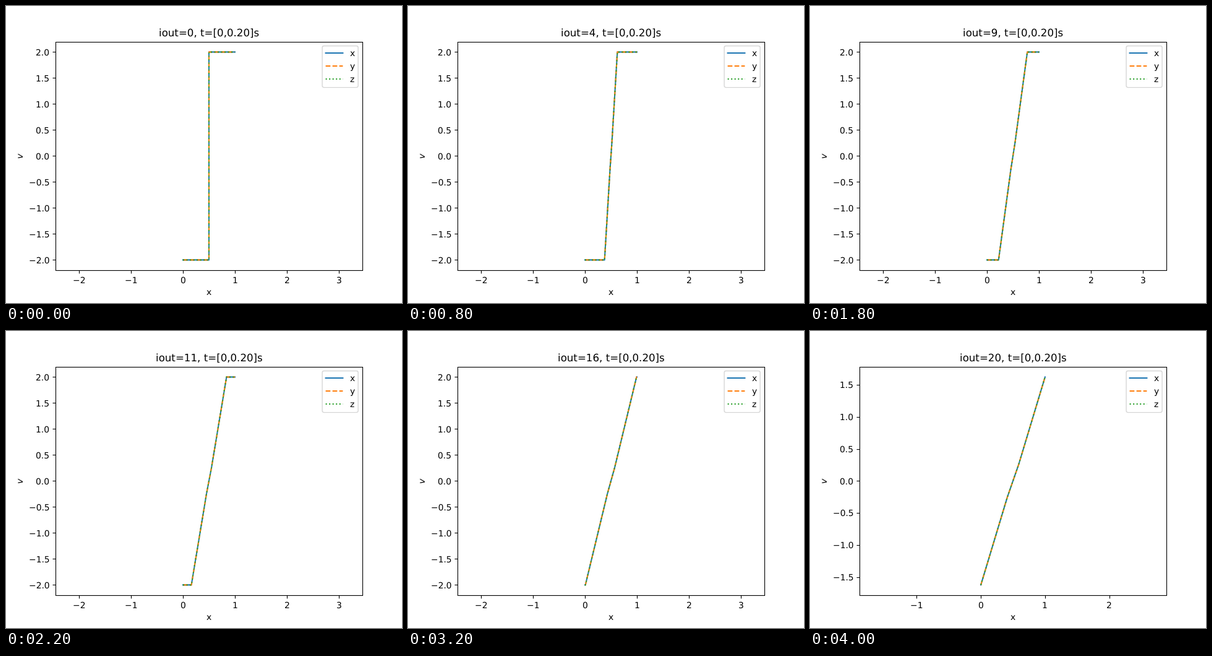
These frames come from a looping animation (640x480 px, 4200 ms). An HTML page with a canvas:

```html
<!DOCTYPE html>
<html lang="en">
<head>
<meta charset="utf-8">
<title>Velocity profile</title>
<style>
html, body { margin: 0; width: 100%; height: 100%; overflow: hidden; background: #fff; }
canvas { display: block; }
</style>
</head>
<body>
<canvas id="plot" width="640" height="480"></canvas>
<script>
const ctx = document.getElementById('plot').getContext('2d');
const STEP = 200, COUNT = 21;
const CX = 328, CY = 242.4, HALF_W = 248, HALF_H = 184.8;
const PT = 100 / 72;
const FONT = '"DejaVu Sans", sans-serif';
const SERIES = [
  { name: 'x', color: '#1f77b4', dash: [] },
  { name: 'y', color: '#ff7f0e', dash: [5.55 * PT, 2.4 * PT] },
  { name: 'z', color: '#2ca02c', dash: [1.5 * PT, 2.475 * PT] }
];

// Rarefaction fan: v is piecewise linear in x/t, with a gentler core.
const CORE_V = 0.25, CORE_S = 0.435, SLOPE = 0.663;
const HEAD_S = CORE_S + (2 - CORE_V) / SLOPE;

function profile(t) {
  const head = Math.min(0.5, HEAD_S * t), core = CORE_S * t;
  const top = HEAD_S * t < 0.5 ? 2 : CORE_V + (0.5 / t - CORE_S) * SLOPE;
  const half = [[core, CORE_V], [head, top], [0.5, top]];
  const mirror = half.map(([x, v]) => [-x, -v]).reverse();
  return { top, points: mirror.concat(half) };
}

function text(str, x, y, align = 0, size = 10 * PT) {
  ctx.font = size + 'px ' + FONT;
  ctx.fillText(str, Math.round(x - ctx.measureText(str).width * align), Math.round(y));
}

function polyline(points) {
  ctx.beginPath();
  points.forEach(([x, y]) => ctx.lineTo(x, y));
  ctx.stroke();
}

function curve(points, { color, dash }) {
  ctx.strokeStyle = color;
  ctx.lineWidth = 1.5 * PT;
  ctx.lineJoin = 'round';
  ctx.lineCap = dash.length ? 'butt' : 'square';
  ctx.setLineDash(dash);
  polyline(points);
  ctx.setLineDash([]);
  ctx.lineCap = 'butt';
}

const signed = (v, digits) => (v < 0 ? '\u2212' : '') + Math.abs(v).toFixed(digits);

function axes(scale) {
  ctx.strokeStyle = ctx.fillStyle = '#000';
  ctx.lineWidth = 0.8 * PT;
  ctx.lineJoin = 'miter';
  for (let k = -3; k <= 4; k++) {
    const x = CX + (k - 0.5) * scale;
    if (Math.abs(x - CX) > HALF_W) continue;
    const px = Math.round(x) + 0.5;
    polyline([[px, 427.5], [px, 432.5]]);
    text(signed(k, 0), x, 448, 0.5);
  }
  for (let k = -4; k <= 4; k++) {
    const y = CY - k / 2 * scale;
    if (Math.abs(y - CY) > HALF_H) continue;
    const py = Math.round(y) + 0.5;
    polyline([[75.5, py], [80.5, py]]);
    text(signed(k / 2, 1), 70.28, y + 5.2, 1);
  }
  text('x', CX, 467, 0.5);
  ctx.save();
  ctx.translate(27, 247);
  ctx.rotate(-Math.PI / 2);
  ctx.font = 'italic ' + 10 * PT + 'px ' + FONT;
  ctx.fillText('v', 0, 0);
  ctx.restore();
}

function legend() {
  ctx.beginPath();
  ctx.roundRect(511.1, 64.5, 58, 67.1, 2.78);
  ctx.fillStyle = 'rgba(255,255,255,0.8)';
  ctx.fill();
  ctx.strokeStyle = 'rgba(204,204,204,0.8)';
  ctx.lineWidth = PT;
  ctx.stroke();
  ctx.fillStyle = '#000';
  SERIES.forEach((s, i) => {
    const y = 76 + 21 * i;
    curve([[516.6, y], [544.4, y]], s);
    text(s.name, 555.5, y + 5);
  });
}

function draw(n) {
  const { top, points } = profile(n / 100);
  const scale = 168 / top;
  ctx.fillStyle = '#fff';
  ctx.fillRect(0, 0, 640, 480);
  axes(scale);
  const path = points.map(([x, v]) => [CX + x * scale, CY - v * scale]);
  SERIES.forEach(s => curve(path, s));
  ctx.strokeStyle = '#000';
  ctx.lineWidth = 0.8 * PT;
  ctx.lineJoin = 'miter';
  ctx.strokeRect(80.5, 58.5, 496, 369);
  text(`iout=${n}, t=[0,0.20]s`, CX, 49, 0.5, 12 * PT);
  legend();
}

ctx.textRendering = 'geometricPrecision';
const start = performance.now();
function tick() {
  draw(Math.floor((performance.now() - start) / STEP) % COUNT);
  requestAnimationFrame(tick);
}
tick();
</script>
</body>
</html>
```
